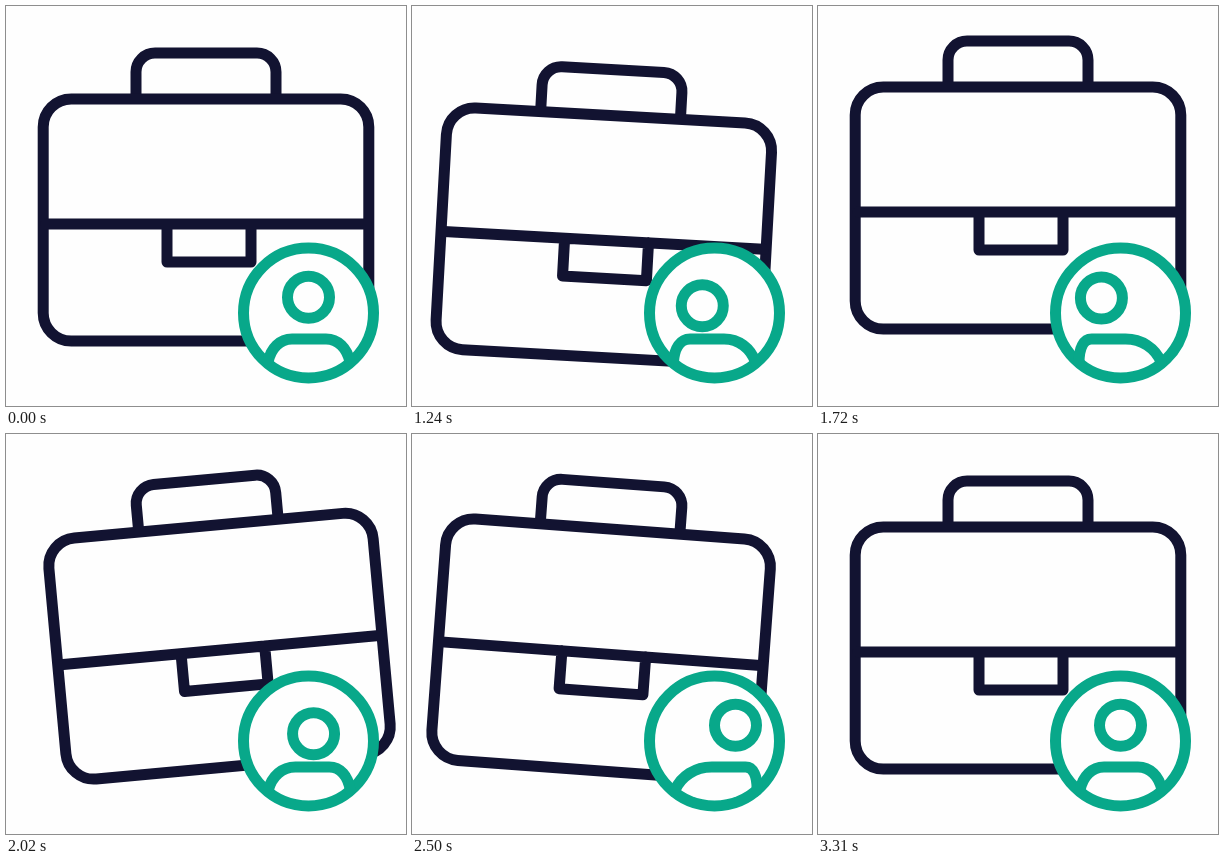
Animation, 400 px wide and 400 px high, one loop 3340 ms. Source, as an HTML page:

```html
<!DOCTYPE html>
<html lang="en">
<head>
<meta charset="utf-8">
<title>Briefcase and profile</title>
<style>
  html, body { margin: 0; height: 100%; overflow: hidden; background: #fefefe; }
  svg { display: block; width: 100%; height: 100%; }
  g { fill: none; stroke-width: 11; stroke-linecap: round; stroke-linejoin: round; }
  #case { stroke: #121331; }
  #profile { stroke: #08a88a; }
</style>
</head>
<body>
<svg viewBox="0 0 400 400">
  <g id="case">
    <path d="M130 93V66a19 19 0 0 1 19-19H251a19 19 0 0 1 19 19V93" stroke-linecap="butt"/>
    <rect x="37.2" y="93" width="325.6" height="242" rx="28"/>
    <path d="M40 218H360M161 218V256H245V218"/>
  </g>
  <g id="profile">
    <circle cx="302.5" cy="307" r="65" fill="#fefefe"/>
    <path id="shoulders"/>
    <circle id="head" cx="302.5" cy="291.3" r="21"/>
  </g>
</svg>
<script>
const LOOP = 3340, HOLD = 1000, STEP = 30;
const $ = id => document.getElementById(id);

// Eased progress from step a to step b
const ease = (n, a, b) =>
  (1 - Math.cos(Math.PI * Math.min(1, Math.max(0, (n - a) / (b - a))))) / 2;

// Swing from zero through a few [step, value] extremes
function swing(n, ...extremes) {
  let from = 0, value = 0, last = 0;
  for (const [to, next] of extremes) {
    value += (next - last) * ease(n, from, to);
    [from, last] = [to, next];
  }
  return value;
}

// Half of the shoulder line: foot, two handles and top, lean in -1..1
const half = (side, lean) =>
  [41 - lean, 38 - 4 * lean, 29 - 9 * lean, 17 - 13 * lean].map(d => 303 + side * d);

function shoulderPath(lean) {
  const [a, b, c, d] = half(-1, lean), [e, f, g, h] = half(1, -lean);
  return `M${a} 356C${b} 342 ${c} 333 ${d} 333H${h}C${g} 333 ${f} 342 ${e} 356`;
}

function draw(time) {
  const n = Math.max(0, Math.floor((time % LOOP - HOLD) / STEP + 1e-6));

  const tilt = swing(n, [17, 7], [31, -7], [44, 7], [60, -2], [77, 0]);
  const drop = swing(n, [15, 30], [25, -13], [40, 5], [58, 0]);
  $("case").setAttribute("transform", `translate(0 ${drop}) rotate(${tilt} 200 66)`);

  // The head looks left, right and back, dipping on each turn
  const turns = [ease(n, 0, 14), ease(n, 22, 43), ease(n, 51, 69)];
  const look = -20 * turns[0] + 41 * turns[1] - 21 * turns[2];
  const nod = turns.reduce((sum, p) => sum + 9 * Math.sin(Math.PI * p), 0);
  $("head").setAttribute("transform", `translate(${look} ${nod})`);
  $("shoulders").setAttribute("d", shoulderPath(look / 20));
}

let start;
function tick(now) {
  start ??= now;
  draw(now - start);
  requestAnimationFrame(tick);
}
draw(0);
requestAnimationFrame(tick);
</script>
</body>
</html>
```
